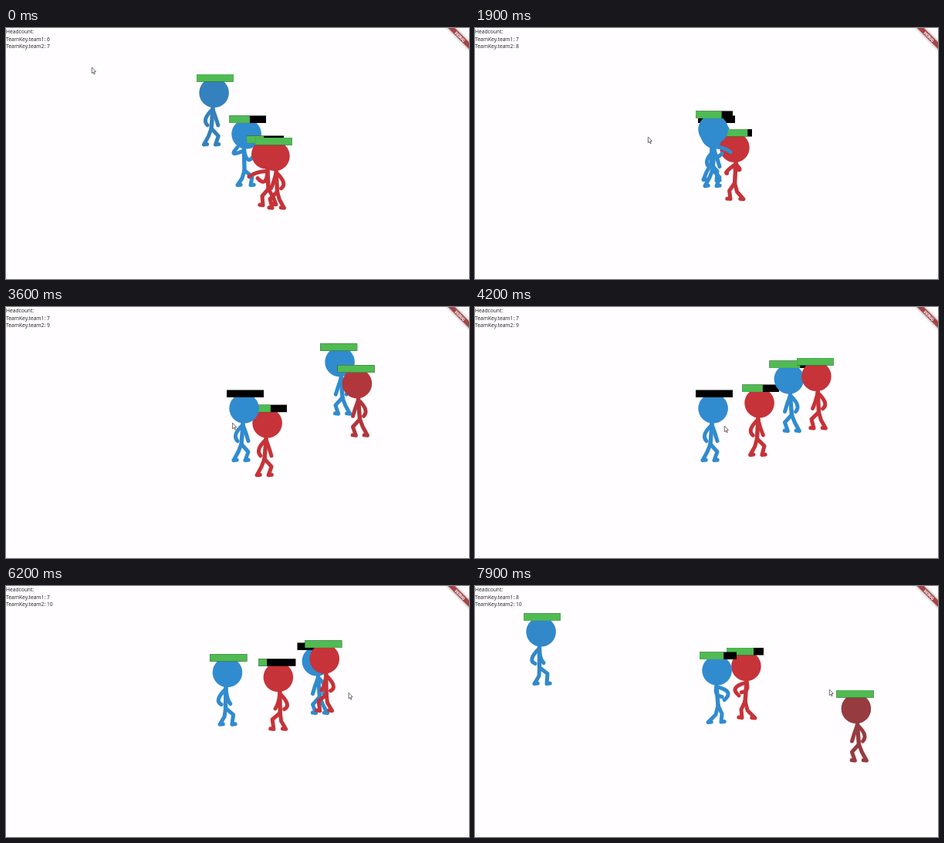
These frames come from a looping animation (600x325 px, 8 s). An HTML page with a canvas:

```html
<!DOCTYPE html>
<html lang="en">
<head>
<meta charset="utf-8">
<title>Stick fight</title>
<style>
  html, body { margin: 0; width: 100%; height: 100%; overflow: hidden; background: #fffdff; }
  #stage { position: relative; width: 600px; height: 325px; overflow: hidden; }
  #score { position: absolute; left: 0; top: .4px; font: 6.7px/9.5px "Open Sans", "Noto Sans", sans-serif; color: #1c1c1c; white-space: pre; }
  canvas { position: absolute; left: 0; top: 0; width: 600px; height: 325px; }
  #banner {
    position: absolute; left: 560px; top: 13.3px; width: 80px; height: 6px;
    transform-origin: 40px -13.3px; transform: rotate(45deg);
    background: #a54346; box-shadow: 0 0 4px rgba(0, 0, 0, .5);
    color: #fff; font: 900 5.1px/6px Roboto, "Open Sans", sans-serif; text-align: center;
  }
</style>
</head>
<body>
<div id="stage">
  <div id="score"></div>
  <canvas id="view"></canvas>
  <div id="banner">DEBUG</div>
</div>
<script>
const LOOP = 8000, STEP = 100, CYCLE = 700, BAR_W = 48, BAR_H = 9.5;
const view = document.getElementById('view');
const score = document.getElementById('score');
const ctx = view.getContext('2d');
const dpr = window.devicePixelRatio || 1;
view.width = 600 * dpr;
view.height = 325 * dpr;

// Joints facing right, measured from the top left of the health bar:
// neck, hip, back elbow, back hand, front elbow, front hand,
// back knee, back foot, front knee, front foot
const POSES = {
  stepA: [21,45, 19,70, 12,57, 14,66, 25,56, 28,66, 15,80, 9,91, 28,80, 24,91],
  stepB: [20.5,45, 20.5,70, 11,58, 15,65, 22,57, 26,64, 20,81, 14,91, 31,78, 30,91],
  guard: [19.5,45, 20,71, 6.5,49, 11,41, 25,57, 33,50, 17,81, 11,90, 30,79, 28,90],
  hook:  [22,45, 24,69, 22,54, 29,58, 36.5,52, 32,62, 21,81, 11,91, 29,80, 28,90.5],
  punch: [21,46, 20,69, 25,59, 34,55, 34,47.5, 45,53, 14,79, 10,89, 28,78, 27,90]
};
const FIGHT = ['punch', 'punch', 'guard', 'guard', 'hook'];

const COLORS = {
  blue: [[58, 112, 156], [49, 139, 207]],
  red: [[150, 60, 64], [198, 51, 56]]
};

// Keys: time, x, y, health, mode (w walk, f fight, i idle), direction.
// Position glides between keys; the other values hold.
const FIGHTERS = [
  { team: 'blue', born: -3000, end: 2300, phase: .43, keys: [
    [0, 289, 113.5, .56, 'f', 1], [900, 289, 113.5, .25, 'f', 1], [1300, 289, 113.5, 0, 'i', 1]] },
  { team: 'red', born: -3000, end: 1800, phase: 0, keys: [
    [0, 312, 139.5, .46, 'f', -1], [500, 312, 139.5, .25, 'f', -1], [900, 312, 139.5, 0, 'i', -1]] },
  { team: 'red', born: -2000, end: 7700, phase: 0, keys: [
    [0, 323, 142, 1, 'w', -1], [600, 316, 136.5, 1, 'f', -1], [900, 316, 136, 1, 'f', -1],
    [1500, 311, 131, .88, 'f', -1], [2300, 311, 131, .65, 'f', -1], [3500, 311, 131, .56, 'w', 1],
    [4200, 346, 100.5, .56, 'w', 1], [4350, 350.5, 97, .56, 'f', 1], [4800, 350.5, 97, .38, 'f', 1],
    [5200, 350.5, 97, .22, 'f', 1], [5800, 350.5, 97, .22, 'w', -1], [6450, 313, 92.5, .22, 'f', -1],
    [6700, 311, 92.5, 0, 'i', -1]] },
  { team: 'blue', born: -800, end: 4500, phase: .36, keys: [
    [0, 247, 60, 1, 'w', 1], [800, 275, 94, 1, 'w', 1], [1100, 286, 107.5, 1, 'f', 1],
    [1500, 286, 107.5, .7, 'f', 1], [2100, 286, 107.5, .42, 'f', 1], [2700, 286, 107.5, .13, 'f', 1],
    [3500, 286, 107.5, 0, 'i', 1]] },
  { team: 'blue', born: 2100, end: 6800, phase: -.07, keys: [
    [2100, 478, 0, 1, 'w', -1], [2900, 437.5, 21, 1, 'w', -1], [4100, 385.5, 66, .83, 'w', -1],
    [4200, 381.5, 69.5, .83, 'w', -1], [4350, 377.5, 73.5, .83, 'f', -1], [4600, 377.5, 73.5, .6, 'f', -1],
    [5000, 377.5, 73.5, .4, 'f', -1], [5300, 377.5, 73.5, .22, 'f', -1], [5800, 377.5, 73.5, 0, 'i', -1]] },
  { team: 'red', born: 2900, end: LOOP, phase: .5, keys: [
    [2900, 437.5, 86.5, 1, 'w', 1], [3100, 440, 83, 1, 'w', -1], [4200, 417, 66, 1, 'w', -1],
    [4350, 411.5, 67, 1, 'f', -1], [5800, 411.5, 67, 1, 'w', -1], [7000, 339, 77.5, 1, 'w', -1],
    [7200, 328, 79.5, 1, 'f', -1], [7400, 327, 80, .9, 'f', -1], [7700, 326, 80, .73, 'f', -1]] },
  { team: 'blue', born: 4300, end: LOOP, phase: .51, keys: [
    [4300, 157, 71, 1, 'w', 1], [5300, 213.5, 80.5, 1, 'w', 1], [6300, 270, 89, 1, 'f', 1],
    [6500, 272, 88.5, .92, 'f', 1], [6700, 273, 88, .92, 'w', 1], [7000, 278, 88, .92, 'w', 1],
    [7200, 289, 86.5, .92, 'f', 1], [7400, 291, 85.5, .8, 'f', 1], [7700, 291, 85.5, .65, 'f', 1]] },
  { team: 'blue', born: 6800, end: LOOP, phase: 0, keys: [
    [6800, 0, 25, 1, 'w', 1], [7000, 12, 27, 1, 'w', 1], [7900, 63, 35.5, 1, 'w', 1]] },
  { team: 'red', born: 7900, end: LOOP, phase: 0, keys: [
    [7900, 468.5, 135, 1, 'w', -1]] }
];

const POINTER = [
  [0, 111, 51], [800, 314, 86], [1700, 224, 141], [2900, 224, 141], [3900, 323, 154],
  [5500, 323, 154], [6300, 461, 136], [7300, 461, 136], [7900, 459, 134]
];

const mix = (a, b, k) => a + (b - a) * k;
const mixAll = (a, b, k) => a.map((v, i) => mix(v, b[i], k));
const wrap = v => v - Math.floor(v);

function sample(keys, t) {
  let i = 0;
  while (i < keys.length - 1 && keys[i + 1][0] <= t) i++;
  const a = keys[i], b = keys[i + 1];
  if (!b) return a;
  const k = Math.max(0, (t - a[0]) / (b[0] - a[0]));
  return [t, mix(a[1], b[1], k), mix(a[2], b[2], k), ...a.slice(3)];
}

function poseAt(mode, f, t) {
  if (mode === 'i') return POSES.stepA;
  if (mode === 'w') {
    const turn = (t - f.born) / CYCLE - .05;
    return mixAll(POSES.stepA, POSES.stepB, .5 - .5 * Math.cos(turn * 2 * Math.PI));
  }
  const u = wrap(t / CYCLE + f.phase) * FIGHT.length, i = Math.floor(u);
  const k = u - i;
  return mixAll(POSES[FIGHT[i]], POSES[FIGHT[(i + 1) % FIGHT.length]], k * k * (3 - 2 * k));
}

function limb(width, ...points) {
  ctx.lineWidth = width;
  ctx.beginPath();
  points.forEach(p => ctx.lineTo(p[0], p[1]));
  ctx.stroke();
}

// A bent arm as one curve through the elbow
function arm(a, elbow, b) {
  ctx.lineWidth = 5;
  ctx.beginPath();
  ctx.moveTo(...a);
  ctx.quadraticCurveTo(2 * elbow[0] - (a[0] + b[0]) / 2, 2 * elbow[1] - (a[1] + b[1]) / 2, ...b);
  ctx.stroke();
}

function drawBody(p) {
  const at = i => [p[2 * i], p[2 * i + 1]];
  const toe = ([x, y]) => [x + 4.2, y - .4];
  const neck = at(0), hip = at(1);
  limb(5.4, [neck[0], neck[1] - 4], neck, hip);
  arm(neck, at(2), at(3));
  arm(neck, at(4), at(5));
  limb(5, hip, at(6), at(7), toe(at(7)));
  limb(5, hip, at(8), at(9), toe(at(9)));
  ctx.beginPath();
  ctx.arc(22.6, 23.8, 19.3, 0, 2 * Math.PI);
  ctx.fill();
}

function drawBar(hp) {
  ctx.fillStyle = '#000';
  ctx.fillRect(0, 0, BAR_W, BAR_H);
  ctx.fillStyle = '#50bb52';
  ctx.fillRect(0, 0, BAR_W * hp, BAR_H);
  ctx.strokeStyle = 'rgba(50, 70, 50, .2)';
  ctx.lineWidth = .5;
  ctx.strokeRect(.25, .25, BAR_W - .5, BAR_H - .5);
}

function drawFighter(f, t) {
  if (t < f.born || t >= f.end) return;
  const [, x, y, hp, mode, dir] = sample(f.keys, t);
  const [young, grown] = COLORS[f.team];
  const rgb = mixAll(young, grown, Math.min(1, (t - f.born) / 1250)).map(Math.round);
  ctx.save();
  ctx.translate(x, y);
  ctx.save();
  if (dir < 0) {
    ctx.translate(BAR_W, 0);
    ctx.scale(-1, 1);
  }
  ctx.fillStyle = ctx.strokeStyle = `rgb(${rgb})`;
  ctx.lineCap = ctx.lineJoin = 'round';
  drawBody(poseAt(mode, f, t));
  ctx.restore();
  drawBar(hp);
  ctx.restore();
}

function drawPointer(t) {
  const [, x, y] = sample(POINTER, t);
  ctx.save();
  ctx.translate(x, y);
  ctx.beginPath();
  [[.3, 0], [.3, 7.6], [2, 6.1], [3.2, 8.8], [4.3, 8.3], [3.1, 5.7], [5.4, 5.4]]
    .forEach(p => ctx.lineTo(p[0], p[1]));
  ctx.closePath();
  ctx.fillStyle = '#fff';
  ctx.strokeStyle = '#333';
  ctx.lineWidth = .7;
  ctx.fill();
  ctx.stroke();
  ctx.restore();
}

function showScore(t) {
  const count = (start, times) => start + times.filter(v => t >= v).length;
  const text = `Headcount:\nTeamKey.team1: ${count(6, [900, 6700])}\n` +
    `TeamKey.team2: ${count(7, [1300, 3500, 5800])}`;
  if (score.textContent !== text) score.textContent = text;
}

function draw(now) {
  const t = Math.floor((now % LOOP) / STEP) * STEP;
  ctx.setTransform(dpr, 0, 0, dpr, 0, 0);
  ctx.clearRect(0, 0, 600, 325);
  FIGHTERS.forEach(f => drawFighter(f, t));
  drawPointer(t);
  showScore(t);
}

const start = performance.now();
function tick() {
  draw(performance.now() - start);
  requestAnimationFrame(tick);
}
tick();
</script>
</body>
</html>
```
